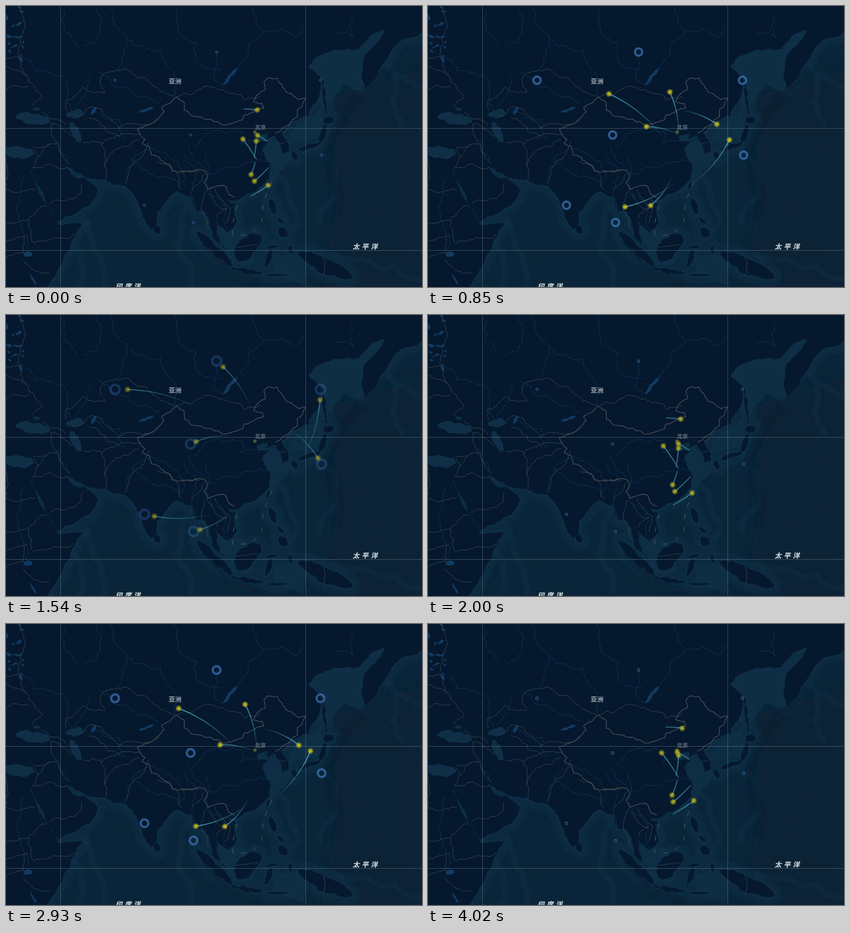
Recreate the animation shown at these times as an HTML page with a canvas. Size 721 px wide and 488 px high, loop 4100 ms.

```html
<!DOCTYPE html>
<html lang="zh">
<head>
<meta charset="utf-8">
<title>Flight map</title>
<style>
html, body { margin: 0; width: 100%; height: 100%; overflow: hidden; background: #0a2539; }
svg, canvas { position: absolute; left: 0; top: 0; width: 721px; height: 488px; display: block; }
path { fill: none; stroke-linejoin: round; }
text { font-family: "Noto Sans CJK SC", "Noto Sans CJK", "Noto Sans", sans-serif; font-weight: 700; }
</style>
</head>
<body>
<svg id="map" viewBox="0 0 721 488">
  <defs>
    <filter id="soft" x="-20%" y="-20%" width="140%" height="140%"><feGaussianBlur stdDeviation="3"/></filter>
    <filter id="haze" x="-50%" y="-50%" width="200%" height="200%"><feGaussianBlur stdDeviation="9"/></filter>
  </defs>
  <g id="sea"></g>
  <g id="land"></g>
  <path d="M94.5 0V488M519.5 0V488M0 212.5H721M0 424.5H721" stroke="#7d919b" stroke-opacity=".42"/>
  <path d="M431.5 214.5l1.2 3h3.2l-2.6 2 1 3.2-2.8-1.9-2.8 1.9 1-3.2-2.6-2h3.2z" style="fill:#59623a"/>
  <text x="282" y="134.5" font-size="11" fill="#98a3aa">亚洲</text>
  <text x="431.5" y="213.5" font-size="9.5" fill="#66757d">北京</text>
  <g font-size="11.5" fill="#ccd5d8" stroke="#ccd5d8" stroke-width=".3" letter-spacing="4.3">
    <text transform="translate(601 422) skewX(-12)">太平洋</text>
    <text transform="translate(190 490.5) skewX(-12)">印度洋</text>
  </g>
</svg>
<canvas id="fx" width="721" height="488"></canvas>
<script>
const LAND = '#05182e', SHELF = '#0f2f46', RIVER = '#113a60', BORDER = '#36424a';
let seed = 7;
const rand = () => (seed = seed * 16807 % 2147483647) / 2147483647;
const inside = ([x, y]) => x >= 0 && x <= 721 && y >= 0 && y <= 488;

// Turns a few key points into a ragged line by displacing midpoints.
function rough(pts, amount = .16, closed = false) {
  if (typeof pts === 'string') pts = pts.trim().split(/\s+/).map(p => p.split(',').map(Number));
  if (closed) pts = [...pts, pts[0]];
  for (let depth = 0; depth < 4; depth++) {
    pts = pts.flatMap((p, i) => {
      if (!i) return [p];
      const q = pts[i - 1], dx = p[0] - q[0], dy = p[1] - q[1];
      const k = inside(p) || inside(q) ? (rand() * 2 - 1) * amount : 0;
      return [[(p[0] + q[0]) / 2 - dy * k, (p[1] + q[1]) / 2 + dx * k], p];
    });
  }
  return 'M' + pts.map(p => p.map(v => v.toFixed(1)).join(' ')).join('L') + (closed ? 'Z' : '');
}

// A ragged, turned ellipse for islands and lakes.
function blob([x, y, rx, ry, deg = 0]) {
  const turn = deg * Math.PI / 180, pts = [];
  for (let i = 0; i < 10; i++) {
    const a = i * Math.PI / 5, u = rx * Math.cos(a), v = ry * Math.sin(a) * (.8 + rand() * .4);
    pts.push([x + u * Math.cos(turn) - v * Math.sin(turn), y + u * Math.sin(turn) + v * Math.cos(turn)]);
  }
  return rough(pts, .16, true);
}

function add(group, d, { fill, ...attrs }) {
  const el = document.createElementNS('http://www.w3.org/2000/svg', 'path');
  el.setAttribute('d', d);
  if (fill) el.style.fill = fill;
  for (const k in attrs) el.setAttribute(k, attrs[k]);
  document.getElementById(group).append(el);
}

const north = `-6,-6 727,-6 727,43 695,56 672,72 650,106 621,146 616,120 622,85 640,68 657,42 630,53 612,75
  565,78 543,86 524,105 546,128 543,155 525,190 492,206 478,220`;
const east = `489,238 490,253 479,257 474,238 466,225 450,232 454,221 434,228 438,236 458,234 444,250 457,272
  457,298 432,322 398,338 384,336 401,375 384,394 364,374 366,398 382,424`;
const south = `357,400 345,358 330,357 322,332 296,322 262,358 260,382 250,388 229,342 206,312 170,301 137,297
  105,279 118,296 138,299 160,319 145,346 90,375 65,325 43,286 57,325 90,379 133,377 100,436 66,494 -6,494`;
const mainland = rough(`${north} ${east} ${south}`, .11, true);

// Centre, half length, half width, turn in degrees.
const isles = [
  [552, 158, 31, 3, 83], [559, 198, 9, 6], [549, 222, 16, 5, 108], [526, 244, 20, 4, -18], [500, 260, 8, 4, 70],
  [454, 311, 6, 2, 110], [394, 345, 4, 3], [262, 388, 8, 5, 75], [462, 348, 14, 5, 70], [476, 373, 7, 3, 40],
  [480, 393, 10, 7, 40], [362, 422, 44, 8, 44], [418, 460, 28, 4, 10], [419, 419, 29, 17, -48], [460, 419, 11, 2, -10],
  [455, 438, 16, 5, -70], [493, 423, 7, 3, 80], [470, 467, 18, 2], [553, 450, 52, 11, 25]
].map(blob).join('');

// Sea floor: dark basins, shelves along the coasts, pale ridges, dark trenches.
const coast = mainland + isles;
add('sea', 'M560 160L721 110V488H545Q590 330 560 160Z', { fill: '#092234', opacity: .8, filter: 'url(#haze)' });
add('sea', coast, { stroke: '#0e2d44', 'stroke-width': 26, opacity: .6, filter: 'url(#soft)' });
add('sea', coast, { stroke: SHELF, 'stroke-width': 7, opacity: .6 });
for (const shelf of [
  '524,80 660,40 622,148 585,136 553,180 520,110', '435,220 480,240 497,262 455,312 436,326',
  '385,372 440,400 428,448 392,452 360,372', '508,204 549,170 540,230 488,240', '462,432 520,438 515,485 465,465'
]) add('sea', rough(shelf, .1, true), { fill: SHELF, opacity: .85 });
for (const ridge of ['140,372 148,400 170,490', '314,345 322,490', '95,400 130,430 125,490', '552,255 576,330 542,380',
  '660,100 690,125 721,142', '675,120 690,210', '470,290 490,335 500,390', '565,430 620,440 721,475'])
  add('sea', rough(ridge), { stroke: '#12374f', 'stroke-width': 7, opacity: .4, filter: 'url(#soft)' });
for (const trench of ['655,112 590,184 557,245 579,330 571,365', '345,410 390,467 440,480'])
  add('sea', rough(trench, .06), { stroke: '#071d2e', 'stroke-width': 6, opacity: .8, filter: 'url(#soft)' });
for (let i = 0; i < 90; i++)
  add('sea', `M${560 + rand() * 160} ${210 + rand() * 250}l${rand() * 5} ${rand() * 3}`,
    { stroke: '#153a4c', 'stroke-width': 1.5, opacity: .35 });

add('land', coast, { fill: LAND, stroke: '#0c2a40', 'stroke-width': .5 });

const inlandSeas = [[46, 196, 31, 10, 8], [53, 179, 6, 3], [119, 187, 16, 7, -10], [121, 219, 20, 8, 65], [22, 253, 27, 11, 5]];
for (const s of inlandSeas) add('land', blob(s), { fill: SHELF });
const lakes = [[388, 123, 20, 3, -50], [243, 180, 14, 2.5, -20], [152, 182, 8, 3, -60], [38, 431, 8, 5], [47, 475, 11, 2, 60]];
for (let i = 0; i < 16; i++) lakes.push([rand() * 38, rand() * 92, 2 + rand() * 5, 1 + rand() * 2, rand() * 180]);
for (const l of lakes) add('land', blob(l), { fill: RIVER });

function net(list, amount, attrs) {
  for (const line of list.split(';')) add('land', rough(line, amount), attrs);
}

net(`100,8 123,70;155,0 162,47 134,70;179,0 210,58 194,111;210,57 268,75 292,158;293,0 297,34 344,108 374,112;
  365,80 360,121 374,137;400,108 420,70 446,45 502,55 516,37;446,45 426,0;569,50 602,55 599,15;
  26,84 50,113 76,118;72,115 100,124 115,180;139,118 147,124 120,178;160,115 190,140 265,168;
  152,182 196,196 207,230;315,244 359,292 402,282 456,270;325,244 375,219 408,218 407,239 438,234;
  346,259 349,300 382,350 385,391;309,257 329,281 329,350;250,245 305,285 300,316;
  217,265 278,296 301,309;248,248 217,278 208,302;89,233 109,273;32,298 18,350 34,425`,
  .2, { stroke: RIVER, 'stroke-width': .9, opacity: .9 });

// Western and central borders, then southern and eastern ones.
net(`0,105 36,121 63,157 44,175;0,146 39,139;20,85 23,0;0,91 26,85 36,120;63,185 104,207;
  78,205 87,240 48,246;77,205 115,227;88,238 110,274;48,249 55,263 76,240;55,263 46,281 107,280;
  76,344 130,324 132,308;0,265 0,318 50,318;0,379 49,363 69,347;40,372 49,412 118,397;
  0,408 38,397;30,400 30,428 0,437;29,441 75,464;
  105,181 103,165 134,141 171,150 165,123 208,109 262,142 291,156`, .17, { stroke: BORDER });
net(`123,193 145,176 181,195 195,212 237,207 262,194;144,194 176,220 198,229;135,237 166,239 172,271 174,301;
  166,239 189,229 232,223;170,279 212,244 231,232;206,309 222,270 247,236;262,270 298,293;305,289 335,287;
  299,293 305,319;344,291 328,313 321,320;350,318 342,335 353,389;350,325 383,352 364,368;
  362,318 389,352 382,377;474,238 486,236;478,220 492,206;398,419 420,416 437,414;548,436 548,469;
  296,158 349,139 388,152 441,157`, .17, { stroke: BORDER });
net(`232,222 228,214 262,198 274,184 270,176 296,158 309,168 309,181 343,196 378,207 410,198 412,190 435,180 447,177
  444,169 429,166 449,146 447,133 454,125 469,125 484,147 508,163 519,160 505,180 505,192 488,207 467,221;
  232,222 241,232 236,239 249,245 252,259 289,287 329,285 344,286 349,294 343,306 350,318 380,313 387,328 396,333`,
  .13, { stroke: '#535658', 'stroke-width': 1.1 });
add('land', 'M461 305Q440 350 444 372Q432 402 393 398Q392 370 401 347', { stroke: '#56615f', 'stroke-dasharray': '8 14' });

// Routes: start, end, side the arc bends to.
const routes = [
  [408, 179, 547, 259, -1], [429, 268.4, 365, 80, 1], [437.5, 272.4, 189, 129, 1], [455.6, 237, 320, 224, 1],
  [419.4, 332.8, 545, 129, 1], [458.7, 276.5, 240, 346, -1], [433, 267.7, 325, 376, -1]
];
const LOOP = 4100, STEPS = 53, TRAIL = .42;
const ctx = document.getElementById('fx').getContext('2d');

function at([x1, y1, x2, y2, side], t) {
  const bend = .3 * side, u = 1 - t;
  const cx = (x1 + x2) / 2 + (y1 - y2) * bend, cy = (y1 + y2) / 2 + (x2 - x1) * bend;
  return [u * u * x1 + 2 * u * t * cx + t * t * x2, u * u * y1 + 2 * u * t * cy + t * t * y2];
}

function drawRing(x, y, t) {
  const outer = 10.6 * Math.sin(t * Math.PI / 2);
  const width = Math.max(.9, outer * .5);
  const alpha = Math.min(.5 + t, 1.05 - .9 * t * t);
  for (const [w, a] of [[width, .65], [width * .55, .6]]) {
    ctx.strokeStyle = `rgba(70,126,196,${alpha * a})`;
    ctx.lineWidth = w;
    ctx.beginPath();
    ctx.arc(x, y, Math.max(.5, outer - width / 2), 0, 7);
    ctx.stroke();
  }
}

function drawTrail(route, t, fade) {
  const from = Math.max(.02, t - TRAIL), n = 30;
  ctx.lineWidth = 1.8;
  for (let i = 0; i < n; i++) {
    const a = from + (t - from) * i / n, b = from + (t - from) * (i + 1) / n;
    if (b <= a) continue;
    ctx.strokeStyle = `rgba(88,178,200,${.85 * fade * (1 - (t - b) / TRAIL)})`;
    ctx.beginPath();
    ctx.moveTo(...at(route, a));
    ctx.lineTo(...at(route, b));
    ctx.stroke();
  }
}

function drawHead([x, y], fade) {
  const glow = ctx.createRadialGradient(x, y, 0, x, y, 6);
  for (const [stop, a] of [[0, .95], [.4, .85], [.65, .45], [1, 0]])
    glow.addColorStop(stop, `rgba(200,190,28,${a * fade})`);
  ctx.fillStyle = glow;
  ctx.fillRect(x - 6, y - 6, 12, 12);
}

function draw(ms) {
  const step = Math.min(STEPS - 1, Math.floor(ms / LOOP * STEPS + .2));
  const t = (.153 + .03904 * step) % 1;
  const fade = t > .75 ? 1 - (t - .75) * 2 : Math.min(1, .7 + t);
  ctx.clearRect(0, 0, 721, 488);
  for (const r of routes) drawRing(r[2], r[3], t);
  for (const r of routes) drawTrail(r, t, fade);
  for (const r of routes) drawHead(at(r, t), fade);
}

const start = performance.now();
function tick() {
  draw((performance.now() - start) % LOOP);
  requestAnimationFrame(tick);
}
tick();
</script>
</body>
</html>
```
